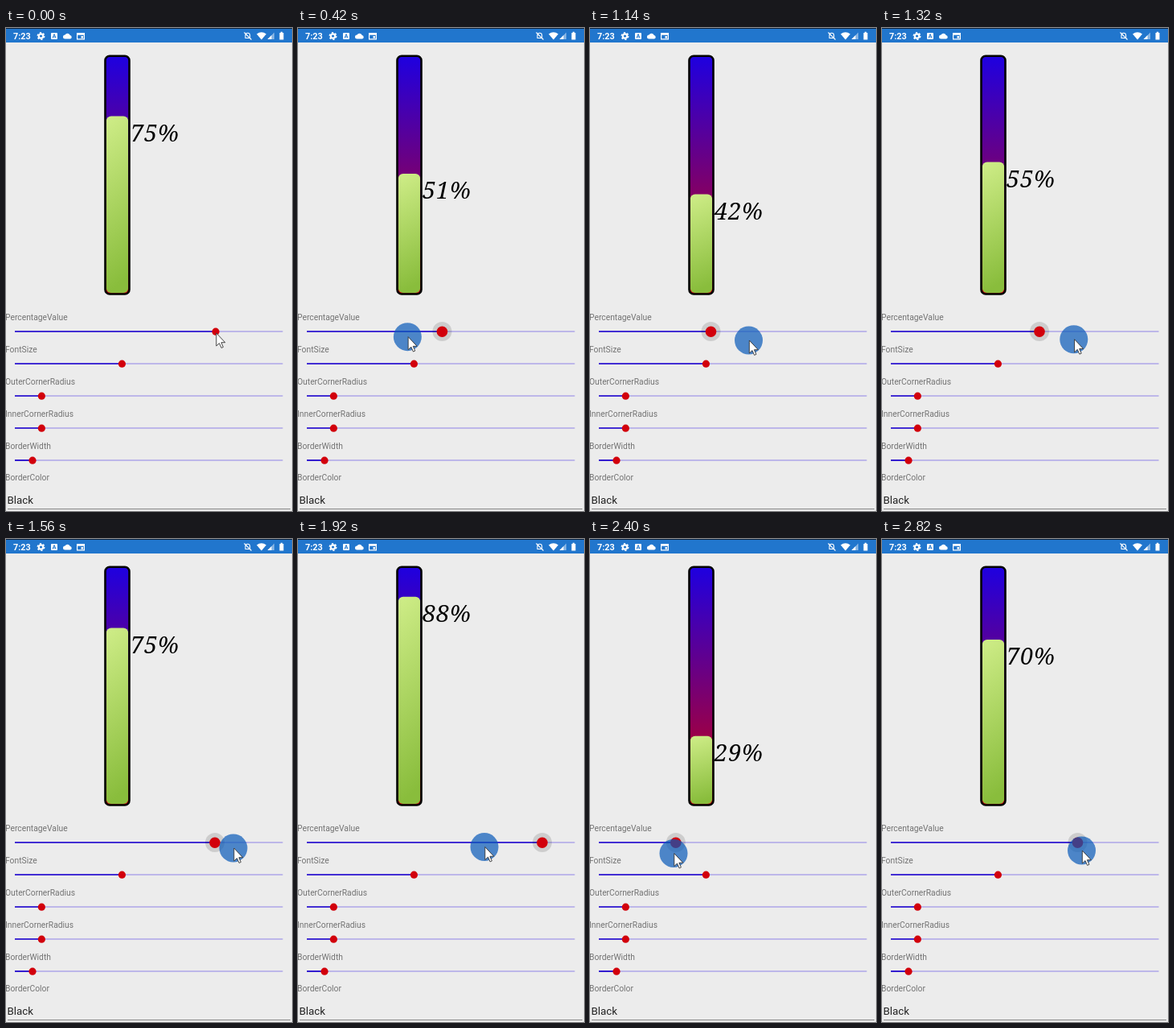
An HTML page that plays this animation: 356x600 px, repeating every 2.88 s.

```html
<!DOCTYPE html>
<html lang="en">
<head>
<meta charset="utf-8">
<title>Percentage bar</title>
<style>
  html, body { margin: 0; width: 100%; height: 100%; overflow: hidden; background: #ececec; }
  svg { display: block; width: 356px; height: 600px; }
  text { font-family: Roboto, sans-serif; }
  .clock { font-size: 10.8px; font-weight: 700; fill: #fff; }
  .label { font-size: 10.3px; fill: #737373; }
  .entry { font-size: 13.3px; fill: #222; }
  #percent { font: italic 29px "Noto Serif", serif; letter-spacing: .8px; fill: #000; }
  .rest { stroke: #aea6e8; stroke-width: 1.7; }
  .done { stroke: #1a00cc; stroke-width: 1.7; }
  .thumb { fill: #d2000c; }
</style>
</head>
<body>
<svg viewBox="0 0 356 600">
  <defs>
    <linearGradient id="track" x2="0" y2="1">
      <stop stop-color="#1e00e0"/>
      <stop offset="1" stop-color="#cc000c"/>
    </linearGradient>
    <linearGradient id="green" x2=".1" y2="1">
      <stop stop-color="#cfed88"/>
      <stop offset="1" stop-color="#89bd3c"/>
    </linearGradient>
  </defs>
  <rect width="356" height="600" fill="#ececec"/>

  <!-- status bar -->
  <rect width="356" height="18" fill="#2176cd"/>
  <rect width="356" height="1" fill="#10233a"/>
  <text class="clock" x="9" y="13.5">7:23</text>
  <g fill="#fff">
    <circle cx="43.5" cy="10" r="2.7" fill="none" stroke="#fff" stroke-width="2.2"/>
    <circle cx="43.5" cy="10" r="4.3" fill="none" stroke="#fff" stroke-width="1.4" stroke-dasharray="2.25"/>
    <rect x="56" y="6" width="8" height="8" rx="1"/>
    <path d="M58 12.5L60 7.5L62 12.5M58.8 11H61.2" fill="none" stroke="#2176cd"/>
    <path d="M73.5 13.5a2.5 2.5 0 0 1 0-5a3.5 3.5 0 0 1 6.3 .5a2.3 2.3 0 0 1 .2 4.5z"/>
    <path d="M88 6h10v8.5h-10zM89.2 8.7v4.6h7.6v-4.6z" fill-rule="evenodd"/>
    <path d="M93.5 10h2.6v2.6h-2.6z"/>
    <path d="M297.5 12.5h7M298 12V9a2.8 2.8 0 0 1 5.6 0v3M296.5 5.5l9 9" fill="none" stroke="#fff" stroke-width="1.1"/>
    <path d="M312 7.6Q318 3 324 7.6L318 14.5Z"/>
    <path d="M325.5 14L334 5.5V14Z" opacity=".45"/>
    <path d="M325.5 14L330.5 9V14Z"/>
    <path d="M340.5 6h1.3v-1.2h2.4v1.2h1.3v8.5h-5z"/>
  </g>

  <!-- bar -->
  <rect x="123.5" y="34.8" width="30" height="295.7" rx="5.5" fill="url(#track)"/>
  <rect id="fill" x="124.8" width="27.4" rx="6" fill="url(#green)"/>
  <rect x="123.5" y="34.8" width="30" height="295.7" rx="5.5" fill="none" stroke="#000" stroke-width="2.6"/>
  <text id="percent" x="155"></text>

  <g id="sliders"></g>
  <text class="label" x="-1" y="562">BorderColor</text>
  <text class="entry" x="1.5" y="591">Black</text>
  <path d="M2 597.5H354" stroke="#858585"/>

  <g id="pointer">
    <circle id="touch" r="17.5" fill="#095aba" fill-opacity=".7"/>
    <path d="M.8 0V16L4.5 12.6L7.1 18.4L9.4 17.4L6.9 11.7H11.8Z" fill="#fff" stroke="#333" stroke-width=".9"/>
  </g>
</svg>
<script>
  const LOOP = 2880, STEP = 60, LEFT = 11, WIDTH = 333.5;
  const $ = id => document.getElementById(id);

  const sliders = { PercentageValue: .75, FontSize: .4, OuterCornerRadius: .1,
    InnerCornerRadius: .1, BorderWidth: .066 };
  $("sliders").innerHTML = Object.entries(sliders).map(([name, part], i) => {
    const x = LEFT + WIDTH * part, y = 377 + 40 * i;
    return `<text class="label" x="-1" y="${y - 14}">${name}</text>
      <path class="rest" d="M${LEFT} ${y}h${WIDTH}"/>
      <path class="done" d="M${LEFT} ${y}H${x}"/>
      <circle class="halo" cx="${x}" cy="${y}" r="0" fill-opacity=".13"/>
      <circle class="thumb" cx="${x}" cy="${y + .2}" r="4.6"/>`;
  }).join("");
  const [done, halo, thumb] = [".done", ".halo", ".thumb"].map(s => document.querySelector(s));

  // key poses of the drag: time, thumb x, pointer x, pointer y
  const poses = [
    [0, 261, 261, 379],
    [360, 196, 150, 383],
    [780, 80.7, 84, 387],
    [1140, 150.5, 197.5, 388],
    [1560, 260, 283, 384],
    [1800, 317, 308, 383],
    [1920, 304, 232, 382.5],
    [2400, 106.8, 104, 390.5],
    [2820, 243.5, 248.5, 387]
  ];

  // speed through pose i, zero at turns and at both ends
  function speed(i, k) {
    const a = poses[i - 1], b = poses[i], c = poses[i + 1];
    if (!a || !c || (b[k] - a[k]) * (c[k] - b[k]) <= 0) return 0;
    return (c[k] - a[k]) / (c[0] - a[0]);
  }

  // smooth cubic through column k of the poses
  function at(t, k) {
    const i = Math.max(poses.findLastIndex((p, n) => p[0] <= t && n < poses.length - 1), 0);
    const a = poses[i], b = poses[i + 1], d = b[0] - a[0];
    const u = Math.min((t - a[0]) / d, 1), v = 1 - u;
    return a[k] * (1 + 2 * u) * v * v + b[k] * u * u * (3 - 2 * u)
      + d * u * v * (speed(i, k) * v - speed(i + 1, k) * u);
  }

  function draw(time) {
    const t = Math.floor(time % LOOP / STEP) * STEP, pressed = t > 0;
    const x = at(t, 1), value = (x - LEFT) / WIDTH * 100;
    const top = 328.8 - 2.925 * value;
    $("fill").setAttribute("y", top);
    $("fill").setAttribute("height", 329 - top);
    $("percent").setAttribute("y", top + 31.2);
    $("percent").textContent = Math.round(value) + "%";
    done.setAttribute("d", `M${LEFT} 377H${x}`);
    thumb.setAttribute("cx", x);
    thumb.setAttribute("r", pressed ? 6.8 : 4.6);
    halo.setAttribute("cx", x);
    halo.setAttribute("r", pressed ? 12 : 0);
    $("touch").style.display = pressed ? "" : "none";
    $("pointer").setAttribute("transform", `translate(${at(t, 2)} ${at(t, 3)})`);
  }

  const start = performance.now();
  function tick() {
    draw(performance.now() - start);
    requestAnimationFrame(tick);
  }
  tick();
</script>
</body>
</html>
```
